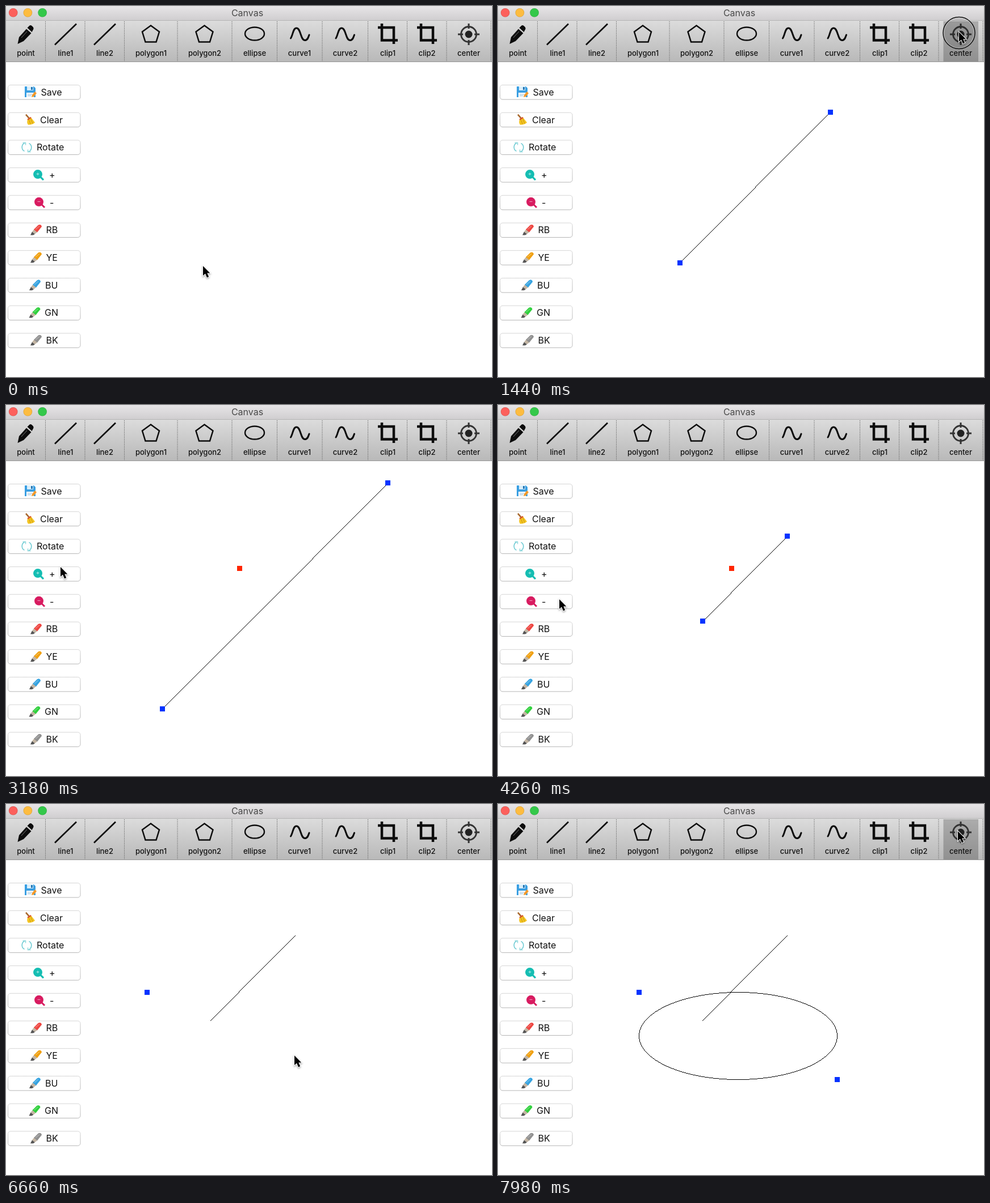
An HTML page with a canvas that plays this animation: 856 by 655 pixels, repeating every 8 s.

```html
<!DOCTYPE html>
<html lang="en">
<head>
<meta charset="utf-8">
<title>Canvas</title>
<style>
html, body { margin: 0; width: 856px; height: 655px; overflow: hidden; background: #fff; }
canvas { display: block; }
</style>
</head>
<body>
<canvas id="stage" width="856" height="655"></canvas>
<script>
const ctx = document.getElementById('stage').getContext('2d');
const LOOP = 8000, STEP = 60, BLUE = '#0433ff', INK = '#0c0c0c';

// label, centre, right separator
const tools = [
  ['point', 35, 69.5], ['line1', 105, 139], ['line2', 174, 208.5], ['polygon1', 255.5, 302],
  ['polygon2', 350, 398], ['ellipse', 438, 477.5], ['curve1', 517, 557], ['curve2', 597.5, 637.5],
  ['clip1', 672.5, 706.5], ['clip2', 741.5, 776], ['center', 815, 854]
];
// label, text left, icon centre, icon, colour
const buttons = [
  ['Save', 61.5, 43, floppy], ['Clear', 60, 42, broom], ['Rotate', 54, 36.5, arrows],
  ['+', 76, 57, lens, '#14bdb2'], ['-', 77, 59, lens, '#d81b60'],
  ['RB', 70.5, 53, marker, '#ee4540'], ['YE', 70.5, 53, marker, '#f0a010'],
  ['BU', 69, 51, marker, '#36a3e0'], ['GN', 68, 50.5, marker, '#2fd03c'],
  ['BK', 70.5, 53, marker, '#909090']
];

// cursor: time, x, y
const route = [
  [0, 347, 459], [240, 320, 453], [420, 320, 453], [690, 585, 187], [780, 585, 187],
  [840, 611, 166], [1260, 812, 46], [1500, 812, 46], [1680, 578, 190], [2100, 411, 288],
  [2460, 411, 288], [2880, 97, 287], [3180, 96, 286], [3480, 96, 286], [3690, 108, 343],
  [4560, 108, 343], [5280, 486, 72], [5640, 437, 47], [5940, 437, 47], [6240, 248, 332],
  [6420, 248, 332], [6660, 508, 444], [6720, 622, 504], [6840, 597, 486], [7080, 597, 486],
  [7740, 809, 48], [8000, 810, 48]
];
const clicks = [[300, 420], [690, 780], [1380, 1500], [2220, 2340], [2940, 3060], [3360, 3420],
  [3720, 3840], [4140, 4200], [5820, 5940], [6300, 6420], [6840, 6960]];
// tool or button index, start, end
const toolPresses = [[10, 1320, 1500], [5, 5760, 5940], [10, 7980, LOOP]];
const buttonPresses = [[3, 2940, 3060], [3, 3360, 3420], [4, 3720, 3840], [4, 4140, 4200]];
const zooms = [[3060, 1.5], [3420, 1.5], [3840, .5], [4200, .5]];

const within = (t, a, b) => t >= a && t < b;
const pressed = (list, i, t) => list.some(p => p[0] === i && within(t, p[1], p[2]));

function fill(path, color) {
  ctx.fillStyle = color;
  ctx.fill(new Path2D(path));
}
function stroke(path, width, color = INK) {
  ctx.lineWidth = width;
  ctx.strokeStyle = color;
  ctx.stroke(new Path2D(path));
}
function disc(x, y, r, color) {
  ctx.beginPath();
  ctx.arc(x, y, r, 0, 7);
  ctx.fillStyle = color;
  ctx.fill();
}
function ring(x, y, r, width, color) {
  ctx.beginPath();
  ctx.arc(x, y, r, 0, 7);
  ctx.lineWidth = width;
  ctx.strokeStyle = color;
  ctx.stroke();
}
function text(s, x, y, font, color, align) {
  ctx.font = font + ' Inter, sans-serif';
  ctx.fillStyle = color;
  ctx.textAlign = align;
  ctx.fillText(s, x, y);
}
function shade(y, h, top, bottom) {
  const g = ctx.createLinearGradient(0, y, 0, y + h);
  g.addColorStop(0, top);
  g.addColorStop(1, bottom);
  return g;
}
function at(x, y, draw) {
  ctx.save();
  ctx.translate(x, y);
  draw();
  ctx.restore();
}

// Small button icons, drawn around 0,0
function floppy() {
  fill('M-10-10H6L9-7V9H-10Z', '#3a9fe2');
  fill('M-6-10H5V-3H-6Z', '#d9eefb');
  fill('M1-9H4V-4H1Z', '#2878b4');
  fill('M-7 1H6V9H-7Z', '#f5fafd');
  stroke('M-5 4H3M-5 6.500H1', 1, '#9dc4dd');
  fill('M2 9L3 5L8-1L11 2L6 8Z', '#f39a2b');
}
function broom() {
  stroke('M-7-9L-1-2', 2.6, '#a9692f');
  fill('M-4 0L2-4L9 5Q5 9-3 9Q-6 5-4 0Z', '#f4c522');
  stroke('M-4 0L2-4', 2.4, '#d9542b');
  stroke('M-1 1L1 8M2-1L5 7', 1, '#c99612');
}
function arrows() {
  stroke('M-4 7A8.300 8.300 0 0 1-3-8M4-7A8.300 8.300 0 0 1 3 8', 1.6, '#6fcbd3');
  stroke('M-7-8H-2V-4M7 8H2V4', 1.5, '#8fd8dc');
}
function lens(color) {
  stroke('M4 4L9 9', 3, color);
  disc(-1, -1, 8, color);
  stroke(color === '#14bdb2' ? 'M-3.500-1.500H1.500M-1-4V1' : 'M-3.500-1.500H1.500', 1, '#ffffffa0');
}
function marker(color) {
  fill('M-10 9L-7 3L-2 7L-5 9Z', '#555');
  fill('M-7 3L-3-2L3 3L-2 7Z', '#c3b5a3');
  fill('M-4-1L4-9Q9-11 10-6L2 4Z', color);
  stroke('M-1-1L6-7', 1.3, '#ffffff50');
}

function toolIcons() {
  ctx.lineCap = 'butt';
  fill('M20.500 67L23 55L36 40.500L44.500 48L31 62Z', INK);
  fill('M37.500 38.500L41 35Q43 33 45.500 35L48 37.500Q49.500 40 47.500 42.500L45.500 46Z', INK);
  stroke('M27 56L37 45', 1, '#777');
  stroke('M86 68.500L124 31.500M155 68.500L193 31.500', 2.7);
  for (const x of [255, 349.5])
    at(x, 0, () => stroke('M0 34.500L15 45.500L9.500 63.500H-9.500L-15 45.500Z', 2.5));
  stroke('M421 49A17 11.500 0 1 0 455 49A17 11.500 0 1 0 421 49Z', 2.4);
  ctx.lineCap = 'round';
  for (const x of [517.5, 597])
    at(x, 0, () => stroke('M-16 57C-12 51-12 39-6 39C2 39 1 60.500 9 60.500C14 60.500 15 55 16.500 51', 3));
  ctx.lineCap = 'butt';
  for (const x of [672, 741])
    at(x, 0, () => stroke('M-10 31V60.500H18M-17 38H11V67', 4.5));
  ring(815, 50, 13.5, 2.8, '#333');
  disc(815, 50, 6.5, '#222');
  stroke('M815 31V40M815 60V69M796 50H805M825 50H834', 3, '#333');
}

function chrome(t) {
  ctx.fillStyle = shade(0, 25, '#e7e5e7', '#d0ced0');
  ctx.fillRect(0, 0, 856, 25);
  ctx.fillStyle = shade(25, 74, '#dcdcdc', '#b8b8b8');
  ctx.fillRect(0, 25, 856, 74);
  ctx.fillStyle = '#b4b4b4';
  ctx.fillRect(0, 25, 856, 1);
  ctx.fillStyle = '#959595';
  ctx.fillRect(0, 98, 856, 1);
  ['#fc605c', '#fdbc40', '#34c84a'].forEach((c, i) => {
    disc(12.7 + i * 25.7, 11.8, 7.8, c);
    ring(12.7 + i * 25.7, 11.8, 7.5, .7, '#00000028');
  });
  text('Canvas', 425, 18, '16px', '#484848', 'center');

  tools.forEach(([label, x, edge], i) => {
    if (pressed(toolPresses, i, t)) {
      ctx.fillStyle = '#00000038';
      ctx.fillRect(x - 30.5, 27, 61.5, 71);
    }
    ctx.setLineDash([1.5, 1.5]);
    stroke(`M${edge} 27V97`, 1, '#666');
    ctx.setLineDash([]);
    text(label, x, 88, '500 13px', '#111', 'center');
  });
  toolIcons();

  buttons.forEach(([label, left, cx, icon, color], i) => {
    const y = 139 + i * 48.7, down = pressed(buttonPresses, i, t);
    ctx.beginPath();
    ctx.roundRect(3.5, y + .5, 127.5, 25.5, 4.5);
    ctx.fillStyle = down ? shade(y, 26, '#5aa5f8', '#1268ee') : '#fff';
    ctx.fill();
    ctx.lineWidth = 1;
    ctx.strokeStyle = shade(y, 26, '#d6d6d6', '#b5b5b5');
    ctx.stroke();
    at(cx, y + 13, () => icon(color));
    text(label, left, y + 18.8, '16px', down ? '#fff' : '#111', 'left');
  });
}

const dot = (x, y) => ctx.fillRect(Math.round(x), Math.round(y), 1, 1);
function handle([x, y], color = BLUE) {
  ctx.fillStyle = color;
  ctx.fillRect(Math.round(x) - 4, Math.round(y) - 4, 9, 9);
}
function pixelLine([x0, y0], [x1, y1]) {
  const n = Math.max(Math.abs(Math.round(x1 - x0)), Math.abs(Math.round(y1 - y0)));
  ctx.fillStyle = '#000';
  for (let i = 0; i <= n; i++) dot(x0 + (x1 - x0) * i / n, y0 + (y1 - y0) * i / n);
}
function pixelEllipse(cx, cy, rx, ry) {
  const turn = rx * rx / Math.hypot(rx, ry), stop = ry * ry / Math.hypot(rx, ry);
  const both = (x, y) => [-1, 1].forEach(s => dot(cx + x, cy + s * y));
  ctx.fillStyle = '#000';
  for (let x = .5 - Math.ceil(turn); x <= turn; x++) both(x, ry * Math.sqrt(1 - (x / rx) ** 2));
  for (let y = 0; y <= stop + 1; y++) {
    const x = rx * Math.sqrt(1 - (y / ry) ** 2);
    both(x, y);
    both(-x, y);
  }
}

function drawing(t) {
  const pivot = [411, 288], start = [320, 453], end = [585, 187];
  const corner = [248, 332], opposite = [597, 486];
  const scale = zooms.reduce((s, [from, k]) => t >= from ? s * k : s, 1);
  const place = p => p.map((v, i) => pivot[i] + (v - pivot[i]) * scale);
  const a = place(start), b = place(end), drop = scale === 1 ? 0 : 1;
  ctx.save();
  ctx.beginPath();
  ctx.rect(0, 99, 856, 556);
  ctx.clip();
  if (t >= 720) pixelLine([a[0], a[1] + drop], [b[0], b[1] + drop]);
  if (t < 6360) {
    if (t >= 360) handle(a);
    if (t >= 720) handle(b);
    if (t >= 2280) handle(pivot, '#ff2600');
  } else {
    handle(corner);
    if (t >= 6900) {
      pixelEllipse(422.5, 409, 174.5, 77);
      handle(opposite);
    }
  }
  ctx.restore();
}

function cursor(t) {
  const i = Math.max(1, route.findIndex(p => p[0] >= t));
  const [t0, x0, y0] = route[i - 1], [t1, x1, y1] = route[i];
  const u = (t - t0) / (t1 - t0), k = u * u * (3 - 2 * u);
  at(x0 + (x1 - x0) * k, y0 + (y1 - y0) * k, () => {
    if (clicks.some(([a, b]) => within(t, a, b))) {
      disc(0, 1.5, 28, '#0000001a');
      ring(0, 1.5, 27, 2, '#ffffff60');
      ring(0, 1.5, 28, 1.5, INK);
    }
    const arrow = 'M0 0V17L4 13.500L7 20.500L10.200 19L7.300 12.500H12.300Z';
    ctx.save();
    ctx.shadowColor = '#00000060';
    ctx.shadowBlur = 3;
    ctx.shadowOffsetY = 1.5;
    stroke(arrow, 2, '#fff');
    ctx.restore();
    fill(arrow, '#000');
  });
}

function frame(now) {
  const t = Math.floor(now % LOOP / STEP) * STEP;
  ctx.fillStyle = '#fff';
  ctx.fillRect(0, 0, 856, 655);
  drawing(t);
  chrome(t);
  cursor(t);
}
const began = performance.now();
(function tick() {
  frame(performance.now() - began);
  requestAnimationFrame(tick);
})();
</script>
</body>
</html>
```
